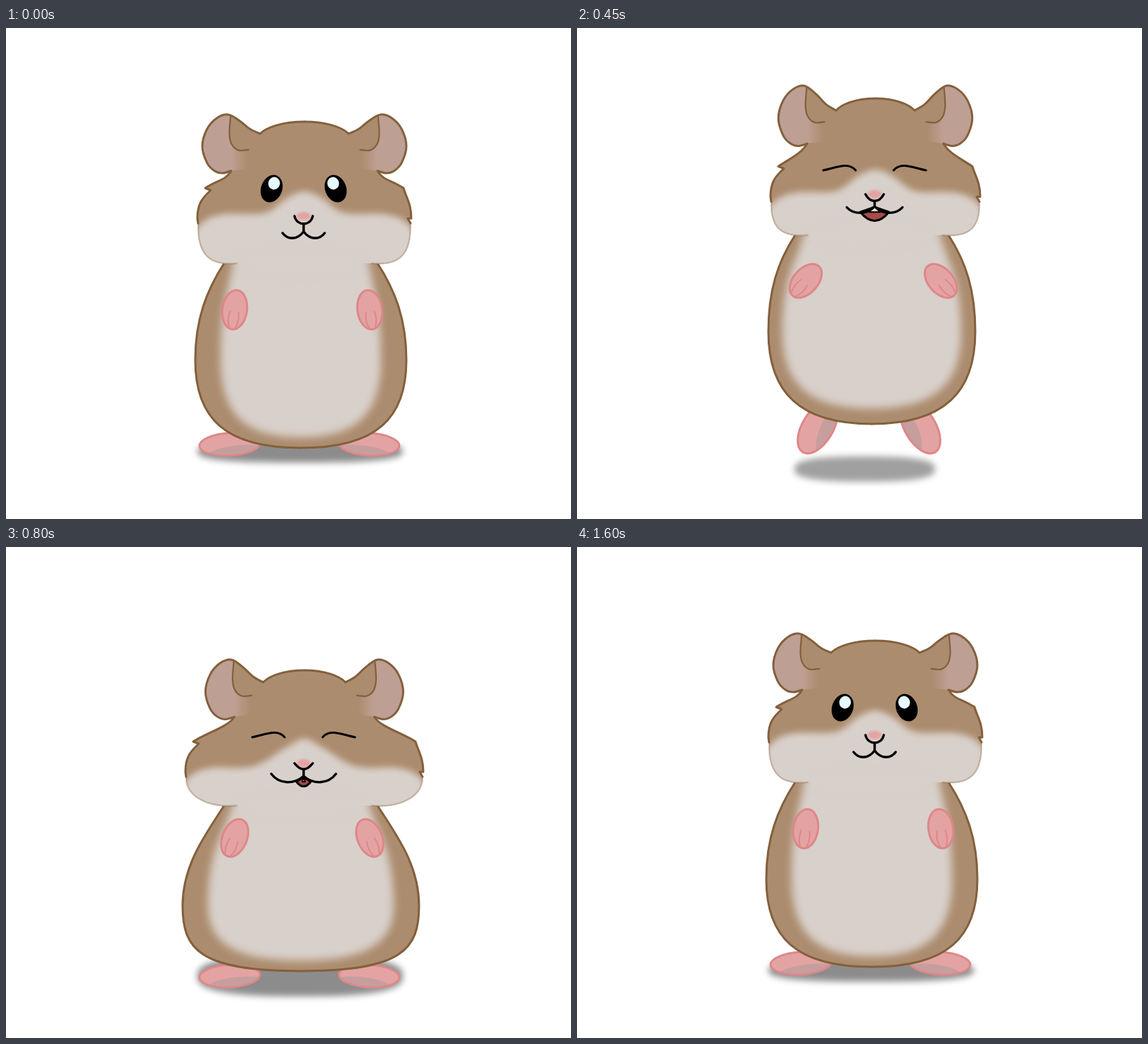
An HTML page with a canvas for the animation above (1850 ms loop, 803 by 697 pixels).

```html
<!DOCTYPE html>
<html lang="en">
<head>
<meta charset="utf-8">
<title>Jumping hamster</title>
<style>
html, body { margin: 0; width: 100%; height: 100%; overflow: hidden; background: #fff; }
canvas { display: block; }
</style>
</head>
<body>
<canvas id="stage" width="803" height="697"></canvas>
<script>
const g = document.getElementById('stage').getContext('2d');
const FUR = '#ac8c6e', LINE = '#83603c', LIGHT = '#d8d0ca', PINK = '#e4a3a3', ROSE = '#de8789', EAR = '#be9f94';
const LOOP = 1850, STEP = 50;
const HEAD_X = 424, FACE_X = 423, BODY_X = 419;

// Heights of the main joints, plus widths, paw tilt and expression; all other shapes follow from these
const rest = { at: 0, crown: 133, ear: 10, eye: 228, nose: 267, chin: 334, paw: 400, bottom: 596, foot: 591,
  cheek: 152, hip: 150, tilt: 8, smile: 0, gape: 0, shade: 601, depth: 16 };
const poses = [
  rest,
  { at: 250, crown: 164, ear: 10, eye: 272, nose: 307, chin: 365, paw: 419, bottom: 623, foot: 621,
    cheek: 151, hip: 159, tilt: 5, smile: 0, gape: 0, shade: 625, depth: 26 },
  { at: 450, crown: 100, ear: 18, eye: 202, nose: 236, chin: 294, paw: 359, bottom: 562, foot: 567,
    cheek: 149, hip: 147, tilt: 42, smile: .6, gape: 12, shade: 626, depth: 18 },
  { at: 600, crown: 74, ear: 39, eye: 167, nose: 213, chin: 286, paw: 315, bottom: 573, foot: 571,
    cheek: 158, hip: 148, tilt: 80, smile: .9, gape: 19, shade: 629, depth: 17 },
  { at: 800, crown: 175, ear: 15, eye: 270, nose: 307, chin: 367, paw: 413, bottom: 602, foot: 609,
    cheek: 169, hip: 168, tilt: 22, smile: 1, gape: 6, shade: 609, depth: 29 },
  { at: 950, crown: 131, ear: 14, eye: 238, nose: 264, chin: 334, paw: 400, bottom: 581, foot: 591,
    cheek: 166, hip: 160, tilt: 8, smile: 1, gape: 0, shade: 604, depth: 27 },
  { ...rest, at: 1100 }
];

const clamp = v => Math.max(0, Math.min(1, v));

function poseAt(t) {
  const last = poses.length - 1;
  if (t >= poses[last].at) t = 0;
  const i = poses.findIndex((p, n) => n < last && t < poses[n + 1].at);
  const from = poses[i], to = poses[i + 1], span = to.at - from.at, u = (t - from.at) / span;
  const p = {};
  for (const key in rest) {
    // Parts stop at their turning points and keep their speed elsewhere
    const slope = k => {
      if (k === 0 || k === last) return 0;
      const a = poses[k][key] - poses[k - 1][key], b = poses[k + 1][key] - poses[k][key];
      return a * b <= 0 ? 0 : (a + b) / (poses[k + 1].at - poses[k - 1].at);
    };
    p[key] = from[key] + (to[key] - from[key]) * u * u * (3 - 2 * u)
      + span * u * (1 - u) * ((1 - u) * slope(i) - u * slope(i + 1));
  }
  const stretch = p.bottom - p.crown - 460;
  p.level = p.nose - 3 - stretch * .25;
  p.air = clamp((p.shade - p.bottom - 23) / 33);
  p.round = clamp((83 - p.chin + p.level) / 12);
  p.hipY = p.bottom - (p.bottom - p.chin) * (.48 - (p.hip - 149) * .0045);
  return p;
}

// Adds a smooth curve through the points to the current path
function smooth(p) {
  g.lineTo(...p[0]);
  for (let i = 0; i < p.length - 1; i++) {
    const b = p[i], c = p[i + 1], a = p[i - 1] || b, d = p[i + 2] || c;
    g.bezierCurveTo(b[0] + (c[0] - a[0]) / 6, b[1] + (c[1] - a[1]) / 6,
      c[0] - (d[0] - b[0]) / 6, c[1] - (d[1] - b[1]) / 6, ...c);
  }
}

function stroke(color, width) {
  g.strokeStyle = color;
  g.lineWidth = width;
  g.stroke();
}

function fill(color, blur = 0) {
  g.filter = blur ? `blur(${blur}px)` : 'none';
  g.fillStyle = color;
  g.fill();
  g.filter = 'none';
}

function oval(x, y, rx, ry, angle, color, blur) {
  g.beginPath();
  g.ellipse(x, y, rx, ry, angle, 0, 7);
  fill(color, blur);
}

// Draws a part on both sides of x; local x points outwards
function mirrored(x, part) {
  for (const s of [-1, 1]) {
    g.save();
    g.translate(x, 0);
    g.scale(s, 1);
    part(s);
    g.restore();
  }
}

function drawShadow({ air, shade, depth }) {
  const w = 146 - 46 * air, grey = 140 + 20 * air;
  const bend = v => Math.sign(v) * Math.abs(v) ** .75;
  g.beginPath();
  for (let a = 0; a < 6.28; a += .05)
    g.lineTo(418 - 9 * air + w * bend(Math.cos(a)), shade + depth * bend(Math.sin(a)));
  fill(`rgb(${grey},${grey},${grey})`, 5);
}

function limb(x, y, rx, ry, degrees, detail) {
  g.save();
  g.translate(x, y);
  g.rotate(degrees * Math.PI / 180);
  oval(0, 0, rx, ry, 0, PINK);
  detail();
  g.beginPath();
  g.ellipse(0, 0, rx, ry, 0, 0, 7);
  stroke(ROSE, 3);
  g.restore();
}

function drawFoot({ foot, air }) {
  const rx = 43 - 2 * air, ry = 16 + 6 * air;
  limb(99 - 26 * air, foot, rx, ry, 3 + 56 * air, () => {
    g.save();
    g.clip();
    oval(-rx * .4, ry * 1.1, rx * 1.2, ry, 0, 'rgba(150,150,150,.38)');
    g.restore();
  });
}

function drawPaw({ paw, tilt }) {
  limb(96, paw, 28, 17.5, 90 - tilt, () => {
    for (const s of [-1, 1]) {
      g.beginPath();
      g.moveTo(3, s * 6);
      g.quadraticCurveTo(15, s * 9, 25, s * 4.5);
      stroke(ROSE, 2);
    }
  });
}

function flank({ chin, hip, hipY, bottom }) {
  const up = hipY - chin, down = bottom - hipY, flat = .72 + (hip - 150) * .008;
  g.lineTo(109, chin);
  g.bezierCurveTo(134, chin + up * .28, hip, hipY - up * .42, hip, hipY);
  g.bezierCurveTo(hip, hipY + down * .66, hip * flat, bottom, 0, bottom);
}

function drawFlank(p) {
  const { chin, hip, hipY, bottom, air } = p;
  const w = hip - 36 + 16 * air, low = bottom - 15 - 7 * air, top = chin - 20;
  g.save();
  g.beginPath();
  g.moveTo(-1, top);
  g.lineTo(105, top);
  flank(p);
  g.lineTo(-1, bottom);
  fill(FUR);
  g.clip();
  g.beginPath();
  g.moveTo(-20, top);
  g.lineTo(94, top);
  g.bezierCurveTo(98, top + 50, w, hipY - (hipY - top) * .6, w, hipY);
  g.bezierCurveTo(w, hipY + (low - hipY) * .75, w * .64, low, 0, low);
  g.lineTo(-20, low);
  fill(LIGHT, 6);
  g.restore();
  g.beginPath();
  flank(p);
  stroke(LINE, 3);
}

// Outer edge, top, width and height of an ear, and where it meets the head
function earBox({ crown, ear }) {
  const outer = 154 - .9 * ear, top = crown - ear, height = 80 + .3 * ear, width = 82;
  const at = ([u, v]) => [outer - u * width, top + v * height];
  return { at, joint: (ear + 17) / height, base: at([.5, .96]), inner: outer - width };
}

function drawEar(p) {
  const { at, joint, base } = earBox(p);
  const rim = [[1, joint], [.83, joint * .76], [.65, joint * .33], [.45, 0], [.25, .06], [.08, .25], [0, .54],
    [.08, .82], [.21, .96], [.35, 1]].map(at).concat([base]);
  const fold = [[.49, .03], [.47, .33], [.51, .51], [.63, .61], [.8, .6]].map(at);
  const tint = g.createLinearGradient(at([.5, 0])[0], 0, at([.78, 0])[0], 0);
  tint.addColorStop(0, EAR);
  tint.addColorStop(1, FUR);
  const outline = () => {
    g.beginPath();
    smooth(rim);
  };
  g.save();
  outline();
  g.lineTo(...at([1, .9]));
  g.closePath();
  fill(tint);
  g.clip();
  g.beginPath();
  smooth(fold);
  [[1.1, joint], [1.1, -.1], [.49, -.1]].forEach(c => g.lineTo(...at(c)));
  fill(FUR);
  g.restore();
  outline();
  stroke(LINE, 3);
  g.beginPath();
  smooth(fold);
  stroke(LINE, 2.2);
}

function arch({ crown }, x) {
  g.lineTo(0, crown);
  g.bezierCurveTo(x * .5, crown, x * .85, crown + 8, x, crown + 17);
}

// Temple and cheek edge, with a tuft at the left temple and one on the right cheek
function cheekEdge({ cheek, level }, [x, y], s) {
  const tx = cheek - 11, ty = level - 36;
  g.lineTo(x, y);
  g.bezierCurveTo(x + 8, y + 14, tx - 18, ty - 12, tx, ty);
  if (s < 0) g.lineTo(tx - 8, ty + 3);
  g.bezierCurveTo(tx + 4, ty + 14, cheek, level - 14, cheek, level + 7);
  if (s > 0) g.lineTo(cheek - 5, level + 7);
  g.lineTo(cheek - 1, level + 14);
}

function jowl({ cheek, level, chin, round }) {
  g.lineTo(cheek - 1, level + 14);
  g.bezierCurveTo(cheek, chin - 40 + 28 * round, 115 + 20 * round, chin - 12 + 16 * round,
    109 - 13 * round, chin);
}

function muzzle({ nose, level, cheek, chin }) {
  const peak = nose - 35, drop = level - peak;
  const half = [[25, peak + drop * .3], [drop * 1.8, level - 1], [cheek - 38, level + 1],
    [cheek - 8, level + 12], [cheek + 15, level + 40]];
  g.beginPath();
  smooth([...half.map(([x, y]) => [-x, y]).reverse(), [0, peak], ...half]);
  g.lineTo(cheek + 30, chin + 60);
  g.lineTo(-cheek - 30, chin + 60);
  fill(LIGHT, 5);
}

function drawHeadSide(p, s) {
  const { base, inner } = earBox(p);
  g.save();
  g.beginPath();
  g.moveTo(-1, p.crown);
  arch(p, inner);
  cheekEdge(p, base, s);
  jowl(p);
  g.lineTo(-1, p.chin);
  fill(FUR);
  g.clip();
  muzzle(p);
  g.restore();

  g.beginPath();
  arch(p, inner);
  stroke(LINE, 3);
  g.beginPath();
  cheekEdge(p, base, s);
  stroke(LINE, 3);
  g.globalAlpha = 1 - .7 * p.round;
  g.beginPath();
  jowl(p);
  stroke(LINE, 2.5);
  g.globalAlpha = 1;
  drawEar(p);
}

function drawEye(y, shut, blink) {
  if (!shut && !blink) {
    oval(45.5, y, 15, 20, -.36, '#000');
    oval(42, y - 7.5, 8.3, 9, -.3, '#e6fafe');
    return;
  }
  const k = blink ? .91 : 1;
  if (blink) y += 5;
  g.beginPath();
  g.moveTo(73 * k, y);
  g.bezierCurveTo(56 * k, y - 3, 38 * k, y - 13, 27 * k, y);
  stroke('#000', 3);
}

function drawMouth({ nose, smile, gape }) {
  const lip = nose + 22 - 2 * smile - .3 * gape, dip = lip + 9;
  const w = 30 + 16 * smile, corner = nose + 24 - 9 * smile, tip = 11 - 2.5 * smile;
  g.save();
  g.translate(FACE_X, 0);
  oval(0, nose, 10, 6, 0, PINK, 1.5);
  if (gape > .5) {
    const half = Math.min(24, gape * 1.7), tooth = Math.max(0, gape - 4);
    g.beginPath();
    g.moveTo(-half, dip - 1);
    g.quadraticCurveTo(0, dip + gape * 2, half, dip - 1);
    g.lineTo(0, lip + 1);
    g.closePath();
    fill('#a44c4b');
    stroke('#000', 3);
    g.beginPath();
    g.moveTo(-Math.min(9, tooth), dip - 1);
    g.lineTo(0, lip);
    g.lineTo(Math.min(9, tooth), dip - 1);
    g.closePath();
    fill('#eedfd8');
    stroke('#000', 2);
  }
  g.beginPath();
  const bend = 10 - 6 * smile, pull = nose + tip * 4 / 3;
  g.moveTo(-13, nose);
  g.bezierCurveTo(-bend, pull, bend, pull, 13, nose);
  g.moveTo(0, nose + tip);
  g.lineTo(0, lip);
  for (const s of [-1, 1]) {
    g.moveTo(s * w, corner);
    g.bezierCurveTo(s * w * .75, dip + 3, s * w * .3, dip + 3, 0, lip);
  }
  stroke('#000', 3.4);
  g.restore();
}

function draw(t) {
  const p = poseAt(t);
  const shut = t >= 350 && t < 1100;
  const blink = t >= 1150 && t < 1300 || t >= 1450 && t < 1600;
  g.fillStyle = '#fff';
  g.fillRect(0, 0, 803, 697);
  drawShadow(p);
  mirrored(417 - 2 * p.air, () => drawFoot(p));
  mirrored(BODY_X, () => drawFlank(p));
  mirrored(HEAD_X, s => drawHeadSide(p, s));
  oval(BODY_X, p.chin, 86, 14, 0, LIGHT, 6);
  mirrored(FACE_X, () => drawEye(p.eye, shut, blink));
  drawMouth(p);
  mirrored(421, () => drawPaw(p));
}

g.lineCap = g.lineJoin = 'round';
const start = performance.now();
let shown = -1;
function tick() {
  const t = Math.floor((performance.now() - start) % LOOP / STEP) * STEP;
  if (t !== shown) draw(shown = t);
  requestAnimationFrame(tick);
}
tick();
</script>
</body>
</html>
```
